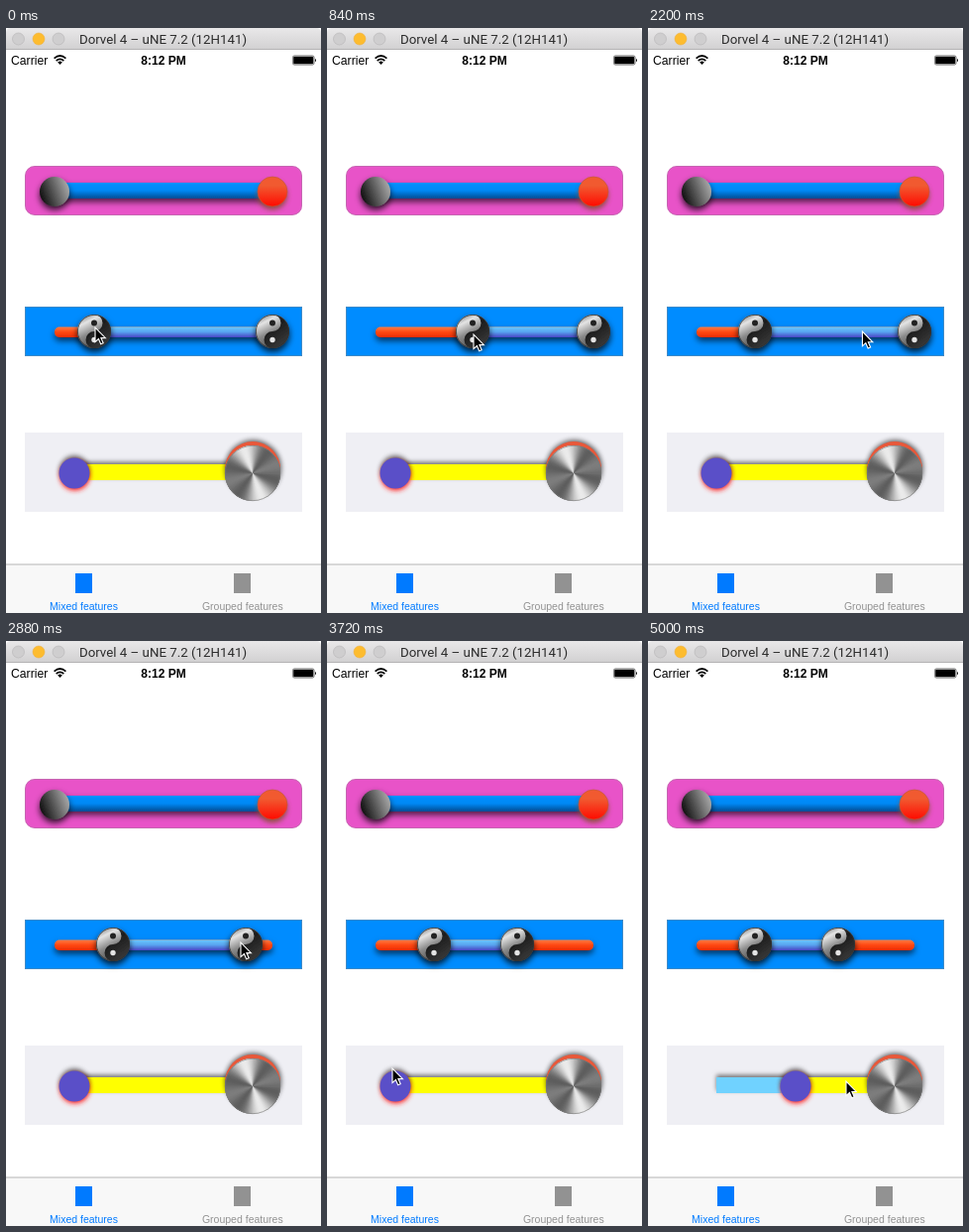
Recreate the animation shown at these times as an HTML page. Size 318x590 px, loop 5040 ms.

```html
<!DOCTYPE html>
<html lang="en">
<head>
<meta charset="utf-8">
<title>Range sliders</title>
<style>
  html, body { margin: 0; width: 100%; height: 100%; overflow: hidden; background: #fff; }
  svg { display: block; width: 100vw; height: 100vh; }
  text { font-family: "Liberation Sans", Arial, sans-serif; }
</style>
</head>
<body>
<svg viewBox="0 0 318 590">
  <defs>
    <linearGradient id="bar" x2="0" y2="1"><stop stop-color="#e9e8e9"/><stop offset="1" stop-color="#d1d0d1"/></linearGradient>
    <linearGradient id="blue" x2="0" y2="1"><stop stop-color="#0090ff"/><stop offset=".5" stop-color="#0088f4"/><stop offset="1" stop-color="#084c92"/></linearGradient>
    <linearGradient id="gray" x1=".02" y1=".65" x2=".95" y2=".3"><stop stop-color="#101010"/><stop offset="1" stop-color="#a6a6a6"/></linearGradient>
    <linearGradient id="red" x2="0" y2="1"><stop offset=".3" stop-color="#f15a30"/><stop offset="1" stop-color="#ff0a00"/></linearGradient>
    <linearGradient id="orange" x2="0" y2="1"><stop stop-color="#ff8048"/><stop offset=".5" stop-color="#ff4a14"/><stop offset="1" stop-color="#f02c00"/></linearGradient>
    <linearGradient id="sky" x2="0" y2="1"><stop stop-color="#6cccff"/><stop offset=".5" stop-color="#58a4f0"/><stop offset="1" stop-color="#4a44c4"/></linearGradient>
    <linearGradient id="silver" x1=".1" x2=".6" y2="1"><stop stop-color="#6c6c6c"/><stop offset=".25" stop-color="#e4e4e4"/><stop offset=".55" stop-color="#8a8a8a"/><stop offset="1" stop-color="#444"/></linearGradient>
    <linearGradient id="coal" x2=".6" y2="1"><stop stop-color="#666"/><stop offset=".45" stop-color="#1c1c1c"/><stop offset="1" stop-color="#383838"/></linearGradient>
    <filter id="drop" x="-60%" y="-60%" width="220%" height="240%"><feDropShadow dx="0" dy="3.5" stdDeviation="3.2" flood-opacity=".8"/></filter>
    <filter id="line" filterUnits="userSpaceOnUse" x="30" y="140" width="260" height="190"><feDropShadow dx="0" dy="3.5" stdDeviation="3" flood-opacity=".65"/></filter>
    <filter id="up" filterUnits="userSpaceOnUse" x="50" y="420" width="230" height="50"><feDropShadow dx="0" dy="-2.5" stdDeviation="2" flood-opacity=".5"/></filter>
    <filter id="soft" x="-50%" y="-50%" width="200%" height="200%"><feGaussianBlur stdDeviation="2.8"/></filter>
    <clipPath id="pill"><rect x="49" y="301.5" width="220" height="10.5" rx="5"/></clipPath>
    <g id="yin">
      <circle r="17" fill="url(#silver)"/>
      <path d="M0-17A17 17 0 0 1 0 17A8.5 8.5 0 0 1 0 0A8.5 8.5 0 0 0 0-17Z" fill="url(#coal)"/>
      <circle cy="-8.5" r="3" fill="#222"/>
      <circle cy="8.5" r="2.7" fill="#e4e4e4"/>
      <circle r="16.6" fill="none" stroke="#333" stroke-width=".8"/>
    </g>
  </defs>

  <rect width="318" height="590" fill="#fff"/>
  <path d="M0 22V5Q0 0 5 0H313Q318 0 318 5V22Z" fill="url(#bar)"/>
  <path d="M0 21.5H318" stroke="#b4b3b4"/>
  <g stroke-width=".6">
    <circle cx="12.5" cy="11" r="6" fill="#cfcecf" stroke="#b5b4b5"/>
    <circle cx="33" cy="11" r="6" fill="#fdbc2f" stroke="#eeb040"/>
    <circle cx="53" cy="11" r="6" fill="#cfcecf" stroke="#b5b4b5"/>
  </g>
  <text x="158.5" y="16" text-anchor="middle" fill="#2c2c2c" style="font:13.3px Roboto,sans-serif">Dorvel 4 – uNE 7.2 (12H141)</text>

  <text x="5" y="36.5" font-size="12.2">Carrier</text>
  <g fill="none" stroke="#000" stroke-width="1.7">
    <path d="M48.6 30.6Q54.5 25.4 60.4 30.6M50.7 33Q54.5 29.8 58.3 33"/>
    <path d="M52.2 34.4Q54.5 32.6 56.8 34.4L54.5 37Z" fill="#000" stroke="none"/>
  </g>
  <text x="159" y="36.5" font-size="12" font-weight="bold" text-anchor="middle">8:12 PM</text>
  <rect x="289.4" y="27.9" width="21.7" height="9.2" rx="1.8" fill="none" stroke="#000" stroke-width=".5"/>
  <rect x="290.2" y="28.7" width="20.1" height="7.6" rx="1"/>
  <path d="M312 30.7Q314 32.5 312 34.3Z"/>

  <rect x="19" y="139" width="280" height="50" rx="10" fill="#e853c8"/>
  <rect x="19.5" y="139.5" width="279" height="49" rx="9.5" fill="none" stroke="#888" stroke-opacity=".35"/>
  <rect x="49" y="156" width="220" height="16" fill="url(#blue)" filter="url(#line)"/>
  <circle cx="49" cy="165" r="15" fill="url(#gray)" filter="url(#drop)"/>
  <circle cx="269" cy="168.5" r="15" fill="#8a5038" opacity=".9" filter="url(#soft)"/>
  <circle cx="269" cy="165" r="15" fill="url(#red)" stroke="#c05a38" stroke-width=".6"/>

  <rect x="19" y="281" width="280" height="50" fill="#008cff"/>
  <rect x="19.5" y="281.5" width="279" height="49" fill="none" stroke="#888" stroke-opacity=".45"/>
  <g filter="url(#line)">
    <g clip-path="url(#pill)">
      <rect x="49" y="301" width="220" height="11" fill="url(#orange)"/>
      <rect id="mid" y="301" height="11" fill="url(#sky)"/>
    </g>
  </g>
  <g id="a"><use href="#yin" filter="url(#drop)"/></g>
  <g id="b"><use href="#yin" filter="url(#drop)"/></g>

  <rect x="19" y="408" width="280" height="80" fill="#efeff4"/>
  <g filter="url(#up)">
    <rect x="69" y="440" width="180" height="16" fill="#70d2ff"/>
    <rect id="rest" y="440" height="16" fill="#ff0"/>
  </g>
  <g id="c">
    <circle cy="-2.5" r="15" opacity=".6" filter="url(#soft)"/>
    <circle cx=".5" cy="2.5" r="15" fill="#ff2020" filter="url(#soft)"/>
    <circle r="15.5" fill="#5a4fc8"/>
  </g>
  <g transform="translate(249 449)">
    <circle cx=".5" cy="-5" r="28.5" opacity=".6" filter="url(#soft)"/>
    <circle cy="-4" r="28" fill="#e8583a"/>
    <circle r="28" fill="#8c8c8c"/>
    <g id="disc"></g>
    <circle r="27.7" fill="none" stroke="#777" stroke-width=".6"/>
  </g>

  <rect y="541" width="318" height="49" fill="#f8f8f8"/>
  <path d="M0 541H318" stroke="#b6b6b6"/>
  <rect x="70" y="550" width="17" height="20" fill="#007aff"/>
  <rect x="230" y="550" width="17" height="20" fill="#929292"/>
  <g font-size="10.5" text-anchor="middle">
    <text x="78.5" y="587" fill="#007aff">Mixed features</text>
    <text x="238.8" y="587" fill="#929292">Grouped features</text>
  </g>

  <path id="cursor" d="M0 0V14.6L3.4 11.5L5.7 16.8L8.2 15.7L5.9 10.6H10.4Z" fill="#000" stroke="#fff" stroke-width="1.1"/>
</svg>
<script>
const LOOP = 5040, STEP = 40;
const $ = id => document.getElementById(id);

// Keys are [time, value]; slopes vanish at turning points, so nothing overshoots.
function track(keys) {
  const slope = i => keys[i + 1] && keys[i] ? (keys[i + 1][1] - keys[i][1]) / (keys[i + 1][0] - keys[i][0]) : 0;
  const tangent = i => {
    const p = i ? slope(i - 1) : slope(0), n = slope(i);
    return p * n > 0 ? 2 * p * n / (p + n) : 0;
  };
  return t => {
    if (t <= keys[0][0]) return keys[0][1];
    const i = keys.findIndex(k => k[0] > t) - 1;
    if (i < 0) return keys[keys.length - 1][1];
    const [t0, v0] = keys[i], [t1, v1] = keys[i + 1];
    const h = t1 - t0, u = (t - t0) / h, w = 1 - u;
    return v0 * w * w * (1 + 2 * u) + v1 * u * u * (3 - 2 * u)
      + h * u * w * (w * tangent(i) - u * tangent(i + 1));
  };
}

const path = [
  [0, 90, 302], [840, 148, 309], [1140, 167, 310], [1560, 118, 311], [1700, 105, 311],
  [1800, 105, 311], [2440, 268, 304], [2560, 268, 304], [2880, 237, 304], [3260, 190, 304],
  [3340, 190, 304], [3720, 66, 431], [3860, 68, 444], [4000, 68, 444], [4400, 107, 445],
  [4720, 150, 445], [4780, 152, 445], [5000, 200, 444]
];
const cursorX = track(path.map(p => [p[0], p[1]]));
const cursorY = track(path.map(p => [p[0], p[2]]));
const thumbA = track([[0, 89], [840, 147], [1160, 166], [1560, 125], [1720, 108]]);
const thumbB = track([[2560, 269], [2880, 242], [3300, 192]]);
const thumbC = track([[3980, 69], [4400, 101], [4760, 149]]);

// Brushed metal: thin wedges shaded by angle.
function metal(r, n) {
  const at = a => `${(r * Math.cos(a)).toFixed(2)} ${(r * Math.sin(a)).toFixed(2)}`;
  let out = "";
  for (let i = 0; i < n; i++) {
    const a = i / n * 2 * Math.PI;
    const g = Math.round(142 + 55 * Math.cos(2 * (a - 1.2)) + 38 * Math.cos(4 * (a - 1.2)));
    out += `<path d="M0 0L${at(a)}L${at(a + 4 * Math.PI / n)}Z" fill="rgb(${g},${g},${g})"/>`;
  }
  return out;
}
$("disc").innerHTML = metal(28, 120);

const move = (id, x, y) => $(id).setAttribute("transform", `translate(${x.toFixed(2)} ${y.toFixed(2)})`);
function span(id, from, to) {
  $(id).setAttribute("x", from);
  $(id).setAttribute("width", to - from);
}

function draw(t) {
  const a = thumbA(t), b = thumbB(t), c = thumbC(t);
  move("a", a, 306);
  move("b", b, 306);
  move("c", c, 449);
  span("mid", a, b);
  span("rest", c, 249);
  move("cursor", cursorX(t), cursorY(t));
}

const start = performance.now();
function tick() {
  const t = (performance.now() - start) % LOOP;
  draw(Math.floor(t / STEP) * STEP);
  requestAnimationFrame(tick);
}
draw(0);
requestAnimationFrame(tick);
</script>
</body>
</html>
```
